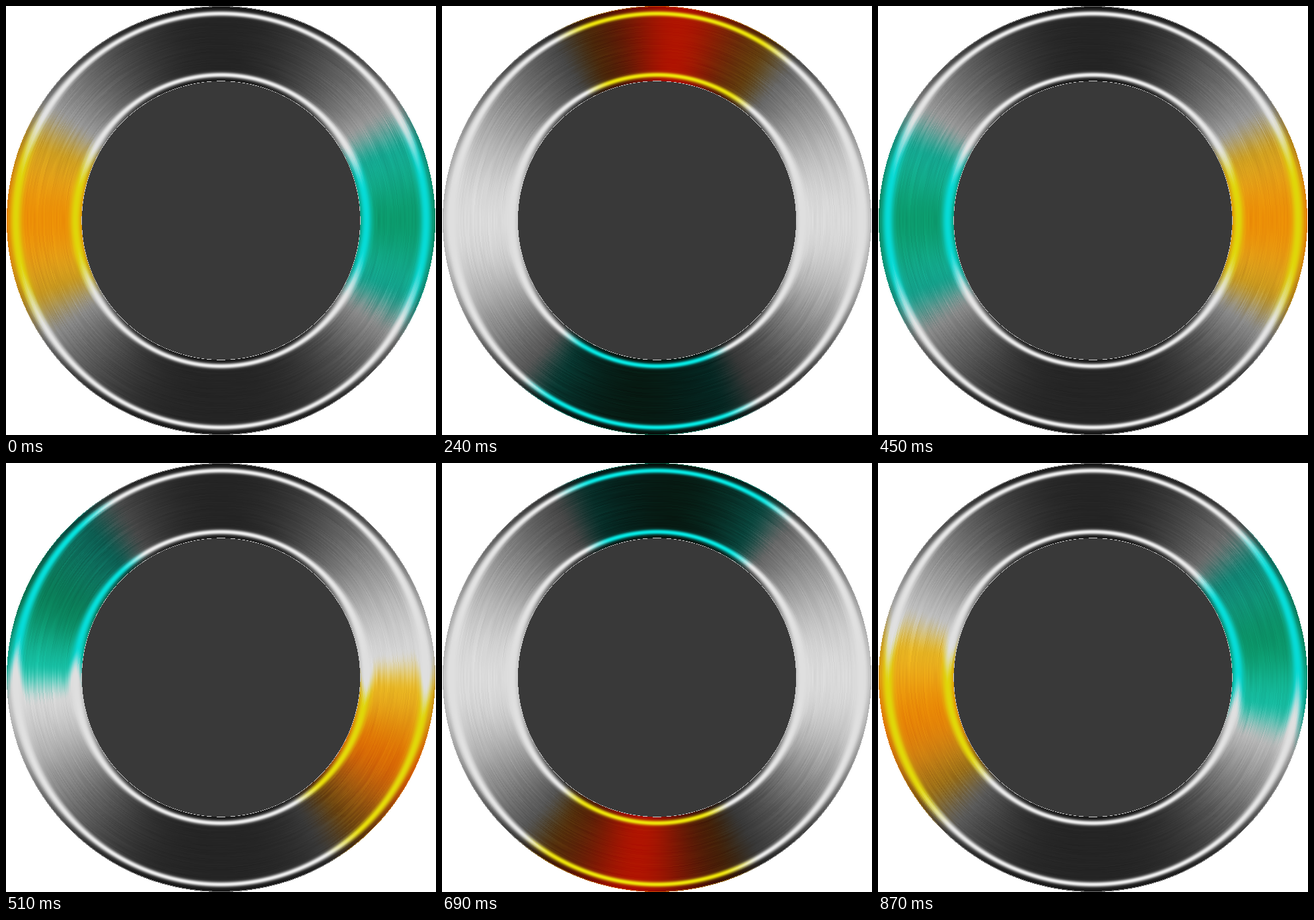
Write an HTML page with a canvas that moves like this. It is 651 px wide and 649 px high and loops after 900 ms.

```html
<!DOCTYPE html>
<html lang="en">
<head>
<meta charset="utf-8">
<title>Metal ring</title>
<style>
  html, body { margin: 0; width: 100%; height: 100%; overflow: hidden; background: #fff; }
  canvas { display: block; }
</style>
</head>
<body>
<canvas id="stage" width="651" height="649"></canvas>
<script>
const W = 651, H = 649, CX = 325.5, CY = 324.5;
const INNER = 210.5, OUTER = 324.5;
const STEP_MS = 30, STEPS = 30, TURN = 360 / STEPS;

const ctx = document.getElementById('stage').getContext('2d');
const image = ctx.createImageData(W, H);
const base = new Uint8ClampedArray(W * H * 4).fill(255);
const ring = [];

const mix = (a, b, t) => a + (b - a) * t;
const smooth = (lo, hi, v) => {
  const t = Math.min(1, Math.max(0, (v - lo) / (hi - lo)));
  return t * t * (3 - 2 * t);
};
const hash = (a, b) => {
  const n = Math.sin(a * 127.1 + b * 311.7) * 43758.5453;
  return n - Math.floor(n);
};

// Noise stretched along the circle: short brushed arcs plus longer grooves.
function streaks(r, deg, length) {
  const cells = Math.round(360 / length), row = Math.floor(r);
  const u = deg / length, cell = Math.floor(u);
  return mix(hash(row, cell % cells), hash(row, (cell + 1) % cells), smooth(0, 1, u - cell)) - 0.5;
}

// Strength of the polished line around the given radius.
const polish = (r, radius, width) => Math.exp(-Math.pow(Math.abs(r - radius) / width, 2.2));

function buildRing() {
  for (let y = 0; y < H; y++) {
    for (let x = 0; x < W; x++) {
      const dx = x + 0.5 - CX, dy = y + 0.5 - CY, r = Math.hypot(dx, dy);
      const i = (y * W + x) * 4;
      if (r > OUTER) continue;
      if (r < INNER + 0.6) {
        base.fill(r < INNER ? 57 : 205, i, i + 3);
        continue;
      }
      const deg = (Math.atan2(dy, dx) * 180 / Math.PI + 360) % 360;
      const side = (dx / r) ** 2;
      const light = Math.pow(side, dy < 0 ? 1.2 : 1.6);
      const grain = streaks(r, deg, 6) * 11 + streaks(r + 500, deg, 24) * 11;
      let body = 36 + 182 * light + grain * (0.3 + 1.8 * light * (1 - light) + 0.4 * light);
      // The bevels beyond the polished lines fall into shade.
      const bevel = Math.max(smooth(314, 321, r), 1 - smooth(212, 219, r));
      body *= 1 - bevel * mix(0.35, 0.12, side * side);
      if (r > OUTER - 1.2) body = mix(body, 170, 0.6);
      const width = 3.8 + 4.5 * side * side;
      const rim = Math.max(polish(r, 313 - 2.5 * side, width), polish(r, 220.3, width));
      const shine = 240 - 17 * side;
      base.fill(mix(body, shine, rim), i, i + 3);
      ring.push({ i, deg, side, body, rim, shine, grain });
    }
  }
}

// Each glow gives the body colour at its middle and at its ends, and the line colour.
const orange = {
  middle: v => [163 + 0.335 * v, 0.68 * v - 5, 0.03 * v],
  end: v => [v + 14, 0.92 * v - 6, 0.2 * v],
  line: v => [v, 0.96 * v, 0.04 * v]
};
const teal = {
  middle: v => [0.03 * v + 5, 0.71 * v, 0.5 * v],
  end: v => [0.12 * v, 0.93 * v, 0.83 * v],
  line: v => [0.03 * v, 0.98 * v, 0.96 * v]
};

function glow(p, offset, { middle, end, line }) {
  const lit = p.side * p.side;
  const reach = 31 - 5 * lit - p.rim * (1 + 9 * lit * lit);
  const amount = 1 - smooth(reach - 6.5, reach + 6.5, offset + p.grain * 0.12);
  if (!amount) return;
  const core = Math.exp(-((offset / 17) ** 2));
  const v = p.body + p.grain * 0.5;
  const a = end(v), b = middle(v), c = line(p.shine);
  for (let k = 0; k < 3; k++) {
    const tint = mix(mix(a[k], b[k], core), c[k], p.rim);
    image.data[p.i + k] = mix(base[p.i + k], tint, amount);
  }
}

function draw(step) {
  const heading = 180 + step * TURN;
  image.data.set(base);
  for (const p of ring) {
    const offset = Math.abs((p.deg - heading + 900) % 360 - 180);
    if (offset < 42) glow(p, offset, orange);
    else if (offset > 138) glow(p, 180 - offset, teal);
  }
  ctx.putImageData(image, 0, 0);
}

buildRing();
draw(0);
const start = performance.now();
let shown = 0;

function tick() {
  const step = Math.floor((performance.now() - start) / STEP_MS) % STEPS;
  if (step !== shown) draw(shown = step);
  requestAnimationFrame(tick);
}
requestAnimationFrame(tick);
</script>
</body>
</html>
```
